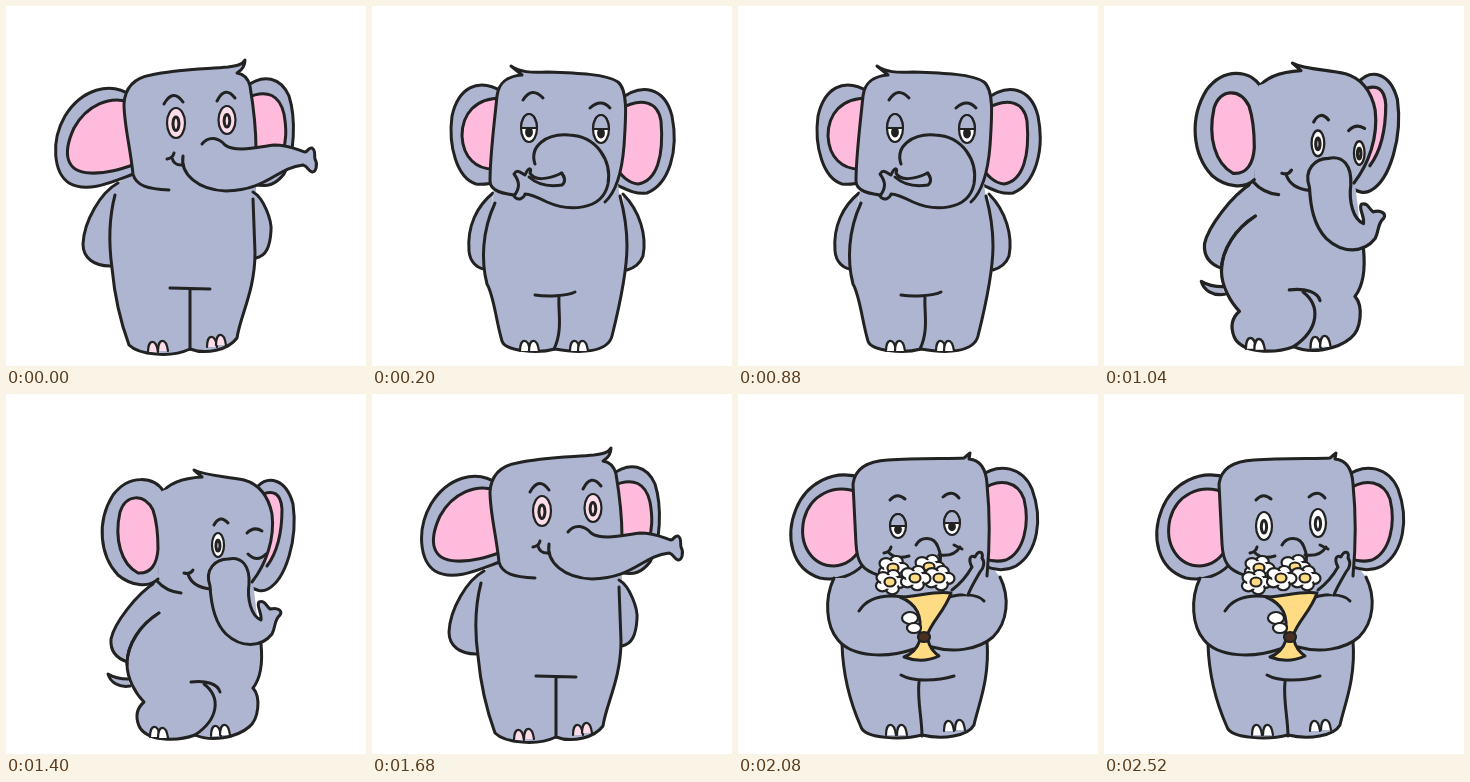
These frames come from a looping animation (360 by 360 pixels, 3.08 s). An HTML page:

```html
<!DOCTYPE html>
<html lang="en">
<head>
<meta charset="utf-8">
<title>Elephant with flowers</title>
<style>
  html, body { margin: 0; height: 100%; overflow: hidden; background: #fff; }
  svg { display: block; width: 100vw; height: 100vh; }
  .ink { fill: none; stroke: #222; stroke-width: 3; stroke-linecap: round; stroke-linejoin: round; }
  .thin { stroke-width: 2.2; }
</style>
</head>
<body>
<svg id="stage" viewBox="0 0 360 360"></svg>
<script>
const SKIN = '#adb5d0', PINK = '#ffbbdc', PALE = '#fbdce8', WHITE = '#fff', YELLOW = '#ffdc83', BROWN = '#4a3020';

// Open paths are filled to their ends but stroked only along the drawn part.
const shape = (d, color = SKIN, extra = '') => `<path class="ink ${extra}" style="fill:${color}" d="${d}"/>`;
const line = d => `<path class="ink" d="${d}"/>`;
const patch = d => `<path fill="${SKIN}" d="${d}"/>`;
const oval = (x, y, rx, ry, color) =>
  `<ellipse class="ink thin" style="fill:${color}" cx="${x}" cy="${y}" rx="${rx}" ry="${ry}"/>`;
const toes = (color, ...spots) => spots.map(([x, y]) =>
  shape(`M${x - 5} ${y + 5}C${x - 5} ${y - 8} ${x + 3} ${y - 9} ${x + 5} ${y + 5}`, color, 'thin')).join('');

function eye(x, y, rx, ry, look = 'open', color = WHITE) {
  if (look === 'closed') return line(`M${x - rx - 3} ${y}Q${x} ${y + 9} ${x + rx + 3} ${y}`);
  const ball = oval(x, y, rx, ry, color);
  if (look === 'open')
    return ball + shape(`M${x} ${y - ry * .4}a${rx * .33} ${ry * .45} 0 1 1 -.1 0Z`, color);
  return ball + oval(x, y + ry * .3, rx * .35, ry * .3, '#222') +
    shape(`M${x - rx} ${y}A${rx} ${ry} 0 0 1 ${x + rx} ${y}Z`, SKIN, 'thin');
}

function flower(x, y) {
  let petals = '';
  for (let i = 0; i < 5; i++) {
    const a = i * Math.PI * .4 - 1.2;
    petals += oval(x + 9 * Math.cos(a), y + 7 * Math.sin(a), 6.5, 5.5, WHITE);
  }
  return petals + `<ellipse cx="${x}" cy="${y}" rx="9" ry="7" fill="#fff"/>` + oval(x, y, 5.5, 4.5, YELLOW);
}

const flowers = () => [[155, 174], [191, 173], [201, 184], [152, 188], [177, 184]]
  .map(p => flower(...p)).join('');
const cone = () =>
  shape('M162 203C178 203 198 196 213 199C207 217 193 228 189 242L181 242C185 222 179 210 162 203Z', YELLOW) +
  shape('M182 246C179 255 174 260 166 263Q184 270 201 262C194 257 191 251 190 246Z', YELLOW) +
  oval(186, 243, 6, 5, BROWN);

const poses = {
  front: () =>
    patch('M110 178L128 166H250V200H107Z') +
    shape('M126 90C104 74 75 84 59 110C44 136 48 167 63 177C82 188 108 175 130 167') +
    shape('M126 97C104 88 80 100 68 122C56 148 60 166 84 167C100 168 115 163 130 158', PINK) +
    shape('M238 82C258 66 275 72 283 90C290 112 289 150 278 168C270 178 262 182 248 178') +
    shape('M240 92C262 82 274 90 278 108C281 125 280 134 277 146L245 147', PINK) +
    shape('M112 177C95 186 78 215 77 238C77 252 88 260 104 260') +
    shape('M247 186C258 192 266 215 265 225C264 241 260 250 250 252') +
    shape('M109 189C103 212 103 240 106 262C109 295 116 320 123 339C133 349 165 352 184 343C200 349 222 344 231 332C234 310 249 285 249 247L247 193') +
    shape('M163 184C142 183 130 180 127 168C124 140 118 118 118 98C119 82 128 72 145 69C170 63 200 63 222 61C230 60 236 59 239 54C239 60 236 64 231 67C238 68 242 72 244 80C247 98 250 120 250 143') +
    shape('M196 138C203 129 213 132 219 139C230 147 252 141 268 139C283 139 292 144 299 146C302 146 302 141 306 142C310 144 308 149 309 153C312 158 310 167 306 166C302 165 302 160 297 159C270 162 262 184 220 185C192 184 174 168 177 150') +
    line('M161 153Q167 152 168 147M166 152Q168 160 177 159') +
    line('M158 98Q167 82 177 96M211 95Q219 79 229 92') +
    eye(170, 117, 9, 15, 'open', PALE) + eye(221, 114, 8.5, 14, 'open', PALE) +
    line('M164 282L204 283M184 284V343') +
    toes(PALE, [147, 341], [157, 340], [206, 336], [215, 334]),

  left: look =>
    shape('M110 84C100 73 86 84 80 108C74 130 76 165 88 179C94 185 104 185 112 179') +
    shape('M104 88C92 90 83 115 85 136C87 160 92 174 106 178', PINK) +
    shape('M231 288C238 293 246 293 251 289L246 287C240 290 236 290 233 286') +
    shape('M214 178C232 188 250 220 251 240C251 253 245 260 233 258') +
    patch('M125 150L205 150L217 185L234 260L112 230V205Z') +
    shape('M103 222C104 260 110 300 124 326C132 343 155 345 172 341C185 348 226 350 229 335C230 325 224 315 218 310C229 298 237 280 235 262C230 248 215 235 203 217') +
    shape('M105 180C95 155 94 125 101 92C107 76 130 74 155 75C168 74 174 72 181 67L182 73C195 74 201 78 206 84L217 176C216 186 208 190 198 190') +
    shape('M195 107C198 85 212 73 228 74C250 76 260 100 260 130C259 160 250 180 234 182C226 182 220 179 214 174') +
    shape('M207 115C207 95 220 87 230 88C245 91 250 112 250 132C250 155 243 167 231 167C213 167 206 150 207 115Z', PINK) +
    shape('M143 152C136 141 113 141 110 152C108 160 114 170 115 182C114 199 111 208 102 210C97 212 92 204 94 197C94 190 91 186 88 190C86 196 88 201 84 203C76 203 71 205 73 208C80 212 84 208 89 211C98 224 120 227 134 217C148 206 152 192 153 177') +
    line('M153 176C162 179 173 168 176 157M167 155L180 155') +
    line('M102 126Q108 113 118 122M136 115Q145 101 155 113') +
    (look === 'closed' ? line('M105 138Q115 144 124 135M136 139Q150 143 162 133')
      : eye(114, 136, 6, 11, look) + eye(148, 134, 8, 13, look)) +
    line('M145 283Q158 287 176 280M161 286C150 300 158 325 186 343') +
    toes(WHITE, [149, 336], [157, 336], [204, 340], [211, 339]),

  turn: () =>
    shape('M131 86C105 70 86 83 80 110C76 140 85 172 104 178C112 179 118 178 128 175') +
    shape('M130 92C103 92 90 108 90 130C91 150 103 165 126 163', PINK) +
    shape('M246 95C270 75 293 82 300 110C307 145 297 178 275 187C262 189 252 182 240 177') +
    shape('M246 104C270 90 286 96 289 115C292 150 285 175 266 178C256 177 250 170 242 160', PINK) +
    shape('M121 187C105 200 95 220 97 245C98 256 105 262 112 263') +
    shape('M251 188C268 205 275 230 271 250C268 258 262 262 255 264') +
    patch('M125 170L245 170L250 208L117 212Z') +
    shape('M123 197C110 225 109 255 115 278C122 290 124 315 130 335C133 345 165 348 183 343C210 348 236 346 240 330C245 310 255 270 255 240C255 220 252 205 248 190') +
    shape('M150 190C130 188 118 185 118 175C118 150 122 120 125 90C127 74 138 70 150 69L139 60C148 66 158 67 175 66C205 67 235 68 246 76C256 84 254 110 252 140C250 165 245 185 233 196') +
    shape('M163 158C157 140 175 127 197 129C225 130 240 155 236 178C230 206 195 205 175 196C165 191 158 188 153 188C152 192 146 196 142 190C148 182 148 176 142 168C146 162 150 168 153 169C157 160 160 162 158 167C162 175 175 174 190 167') +
    line('M157 171C166 179 178 181 190 179C194 176 193 170 189 167') +
    line('M151 94Q160 80 171 92M218 102Q229 92 238 102') +
    eye(157, 122, 8, 14, 'half') + eye(229, 123, 8, 14, 'half') +
    line('M163 289C175 291 195 290 203 286M187 291C186 305 191 325 182 343') +
    toes(WHITE, [153, 340], [162, 340], [203, 340], [211, 340]),

  right: look =>
    shape('M252 92C262 82 280 84 287 110C292 145 280 185 262 195C255 199 250 196 242 192') +
    shape('M252 102C268 94 275 100 276 115C276 140 270 160 261 172', PINK) +
    shape('M122 285C113 285 107 283 102 280C104 288 113 294 124 292') +
    shape('M150 188C130 200 108 230 105 245C104 258 112 265 122 268') +
    patch('M152 180L246 180L255 255L121 268Z') +
    shape('M247 294C255 303 253 325 243 333C230 344 205 348 189 341C170 348 140 347 133 332C129 322 131 314 138 308C130 300 121 285 121 270C121 250 135 230 153 219') +
    patch('M121 268L153 219L255 250Q259 275 247 294L200 300Z') +
    line('M153 219C135 230 121 250 121 270M255 250C257 270 254 285 247 294') +
    shape('M175 199C165 198 158 195 151 187L155 100C163 88 178 84 196 83L188 76C200 82 220 82 238 86C252 90 262 100 266 120C269 145 260 170 246 188') +
    shape('M158 98C148 82 123 80 107 101C90 128 94 162 112 181C125 192 143 194 152 185') +
    patch('M156 97L170 92L170 192L152 183Z') +
    shape('M147 116C138 99 120 100 114 118C108 145 115 170 132 179C145 180 151 170 152 155C152 140 150 125 147 116Z', PINK) +
    shape('M204 192C198 175 210 165 222 165C236 162 244 172 243 190C241 205 245 222 255 226C256 218 250 212 253 208C259 206 260 212 264 215C272 213 277 217 274 221C268 226 270 232 266 240C255 254 235 254 220 240C208 228 205 210 204 192') +
    line('M178 179Q184 181 187 176M182 180C185 190 195 194 204 195') +
    line('M208 131Q214 120 222 129M241 139Q248 132 256 137') +
    eye(212, 151, 6, 12) + eye(251, 160, look === 'wink' ? 6 : 5, 11, look === 'wink' ? 'closed' : look) +
    line('M185 288C200 286 212 290 214 298M198 290C215 303 213 325 189 341') +
    toes(WHITE, [149, 338], [157, 339], [210, 337], [219, 336]),

  gift: look =>
    patch('M96 185L124 168H250L262 183V205H110Z') +
    shape('M124 84C95 74 68 90 58 115C47 142 53 175 82 184C100 188 116 180 124 172') +
    shape('M122 99C95 88 72 102 66 125C60 152 75 172 96 172C110 171 118 162 122 155', PINK) +
    shape('M241 83C262 67 285 74 294 95C305 125 300 158 278 172C268 177 258 177 247 172') +
    shape('M242 97C262 82 280 88 286 105C292 130 286 158 268 166C260 168 254 168 246 164', PINK) +
    shape('M104 250C105 285 115 315 123 333C127 345 165 346 184 341C205 346 230 342 236 331C240 312 252 285 249 247') +
    shape('M96 184C86 205 88 232 100 246C115 264 150 264 176 255L194 253C215 259 240 256 255 243C270 228 272 203 262 183') +
    shape('M140 181C124 176 119 168 118 150L115 90C117 74 130 67 150 66C180 64 215 65 226 64L232 59L231 65C242 66 248 74 249 90C252 120 252 150 249 182') +
    line('M121 217C130 203 145 200 165 203C174 204 179 208 183 214M203 206C222 198 240 200 246 207') +
    line('M178 151C183 142 196 142 200 153C203 160 203 167 201 172') +
    line('M146 159Q152 158 153 153M150 158Q158 166 171 162M201 161Q216 163 222 153M216 151L224 155') +
    shape('M214 196C222 190 230 180 234 173C230 166 232 160 237 163C240 156 246 157 244 164C247 168 246 174 242 178C238 185 232 195 230 201') +
    flowers() + cone() +
    oval(172, 224, 8, 6, WHITE) + oval(176, 234, 7, 5, WHITE) +
    line('M152 106Q159 98 167 105M205 103Q214 95 221 104') +
    eye(160, 132, 8, look === 'half' ? 12 : 14, look) + eye(214, 129, 8, look === 'half' ? 12 : 14, look) +
    line('M163 281C175 288 200 287 216 282M181 288C179 305 184 325 184 342') +
    toes(WHITE, [153, 336], [164, 336], [211, 332], [222, 331]),

  reveal: () => poses.front() +
    shape('M112 188C95 190 75 205 62 222C58 236 70 244 82 238C96 228 108 222 118 220') +
    `<g transform="translate(-130 10)">${flowers()}${cone()}</g>` + oval(58, 233, 7, 5, WHITE)
};

// Start time, pose, eyes, horizontal and vertical scale about the feet
const steps = [
  [0, 'front'], [200, 'turn'],
  [280, 'left', 'open', 1.08, 1.04], [440, 'left', 'closed'], [520, 'left', 'closed', 1, .98], [600, 'left', 'closed', 1, .97],
  [880, 'turn'], [960, 'front'],
  [1040, 'right', 'open', 1.06, 1.07], [1240, 'right', 'half', 1.02, 1.03], [1320, 'right', 'wink', 1, .99], [1400, 'right', 'wink'],
  [1640, 'turn', '', -1], [1680, 'front'],
  [1800, 'reveal'], [1880, 'gift', 'open', 1.02, .97], [1920, 'gift', 'open', 1, .995],
  [2080, 'gift', 'half'], [2120, 'gift', 'closed'], [2200, 'gift', 'half'],
  [2240, 'gift', 'open'], [2480, 'gift', 'half'], [2520, 'gift', 'open']
];

const stage = document.getElementById('stage');
const origin = performance.now();
let shown;

function draw() {
  const time = (performance.now() - origin) % 3080;
  const step = steps.findLast(([start]) => start <= time);
  if (step !== shown) {
    const [, pose, look, sx = 1, sy = 1] = shown = step;
    stage.innerHTML =
      `<g transform="translate(180 346) scale(${sx} ${sy}) translate(-180 -346)">${poses[pose](look)}</g>`;
  }
  requestAnimationFrame(draw);
}

draw();
</script>
</body>
</html>
```
